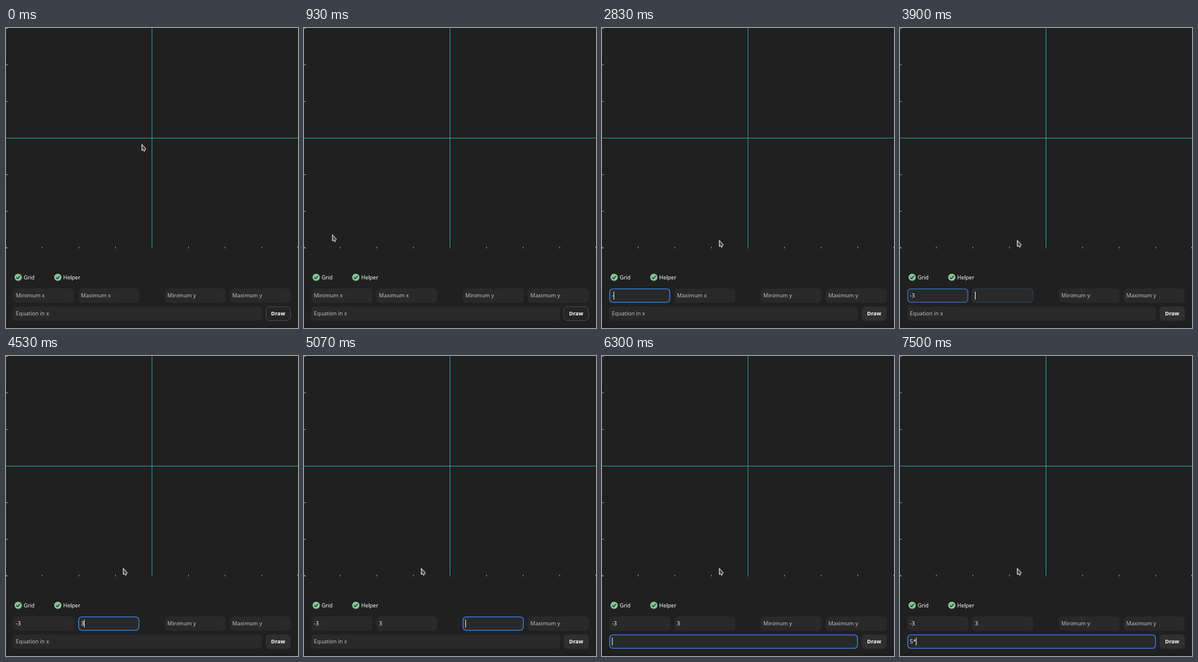
Recreate the animation shown at these times as an HTML page. Size 487 px wide and 500 px high, loop 8000 ms.

```html
<!DOCTYPE html>
<html lang="en">
<head>
<meta charset="utf-8">
<title>Function plotter</title>
<style>
  html, body { margin: 0; width: 100%; height: 100%; overflow: hidden; background: #202020; }
  svg { display: block; width: 487px; height: 500px; }
  text { font: 9px "Noto Sans", "Open Sans", sans-serif; fill: #fff; white-space: pre; }
  .hint { fill: #c0c0c0; }
  .bold { font-weight: 700; }
  .field { fill: #292929; }
  .ring { fill: none; stroke: #3478d0; stroke-width: 1.6; }
  .axis { fill: #30a29b; }
  .tick { fill: #a0a0a0; }
</style>
</head>
<body>
<svg id="stage" viewBox="0 0 487 500"></svg>
<script>
const LOOP = 8000;
const FADE = 200;
const stage = document.getElementById('stage');

function add(tag, attrs, content = '') {
  const el = document.createElementNS('http://www.w3.org/2000/svg', tag);
  for (const key in attrs) el.setAttribute(key, attrs[key]);
  el.textContent = content;
  return stage.appendChild(el);
}
const rect = (cls, x, y, width, height, rx = 0) => add('rect', { class: cls, x, y, width, height, rx });
const text = (cls, x, y, content) => add('text', { class: cls, x, y }, content);
const ramp = (t, start, length) => Math.min(1, Math.max(0, (t - start) / length));
const ease = p => 1 - (1 - p) ** 2;

// Plot area
for (let i = 0; i <= 8; i++) rect('tick', Math.min(486, Math.floor(i * 60.9)), 364.5, 1, 2.8);
for (let i = 0; i <= 6; i++) rect('tick', 0, Math.floor(i * 61.15), 3, 1);
rect('axis', 243, 0, 1, 367);
rect('axis', 0, 183, 487, 1);
add('rect', { x: 0, y: 496, width: 487, height: 4, fill: '#1d1d1d' });

// Check boxes
[[20.3, 'Grid'], [86.4, 'Helper']].forEach(([x, label]) => {
  add('circle', { cx: x, cy: 415.5, r: 6.1, fill: '#82c496' });
  add('path', { d: `M${x - 3} 415.7l2.1 2.1 4-4.4`, fill: 'none', stroke: '#202020', 'stroke-width': 1.4 });
  text('', x + 9.1, 418.7, label);
});

// Button: outlined at rest, filled once the window is active
const button = rect('', 433.5, 464.5, 41, 23, 5.5);
text('bold', 442, 479.3, 'Draw');

// Each field: focus interval and the moments at which its text grows
const fields = [
  { x: 12, y: 434, w: 102, hint: 'Minimum x', from: 1530, to: 3880, typed: [[2830, '-'], [3230, '-3']], off: 2430 },
  { x: 120.4, y: 434, w: 102, hint: 'Maximum x', from: 3880, to: 4830, typed: [[4400, '3']] },
  { x: 264.5, y: 434, w: 102, hint: 'Minimum y', from: 4830, to: 5150, typed: [] },
  { x: 373, y: 434, w: 102, hint: 'Maximum y', from: 5150, to: 5480, typed: [] },
  { x: 12, y: 464, w: 415, hint: 'Equation in x', from: 5480, to: LOOP + FADE, typed: [[6730, '5'], [7470, '5*']], off: 6300 }
];
for (const f of fields) {
  rect('field', f.x, f.y, f.w, 24, 6);
  f.ring = rect('ring', f.x + .8, f.y + .8, f.w - 1.6, 22.4, 5.4);
  f.label = text('hint', f.x + 4.6, f.y + 15.1, f.hint);
  f.caret = add('rect', { y: f.y + 5.3, width: 1, height: 13.2, fill: '#fff' });
}

const arrow = add('path', {
  d: 'M.6.8V11L3 10.1 4.6 12.9 7.2 8Z', fill: '#505050', stroke: '#f4f4f4', 'stroke-linejoin': 'round'
});
const beam = add('path', {
  d: 'M-2.5-4.8Q0-4.8 0-3.4Q0-4.8 2.5-4.8M0-3.4V3.6M-2.5 5Q0 5 0 3.6Q0 5 2.5 5', fill: 'none', stroke: '#e4e4e4', 'stroke-width': 1.2
});

// Pointer path: time, x, y
const path = [
  [0, 226, 193], [700, 226, 193], [760, 205, 212], [930, 47, 343], [1060, 8, 425], [1170, 20, 474],
  [1280, 42, 480], [1500, 59, 452], [1760, 59, 452], [1850, 80, 427], [2000, 150, 376], [2170, 195, 353], [LOOP, 195, 353]
];
function pointerAt(t) {
  const i = path.findIndex(p => p[0] > t);
  const [a, b] = [path[i - 1], path[i]];
  const p = ramp(t, a[0], b[0] - a[0]);
  return [a[1] + (b[1] - a[1]) * p, a[2] + (b[2] - a[2]) * p];
}

function drawField(f, t) {
  const focused = t >= f.from && t < f.to;
  const last = f.typed.filter(([at]) => t >= at).pop();
  const value = last ? last[1] : '';
  const showHint = !value && !focused;
  f.label.textContent = showHint ? f.hint : value;
  f.label.setAttribute('class', showHint ? 'hint' : '');
  f.ring.setAttribute('opacity', ease(ramp(t, f.from, FADE)) * (1 - ease(ramp(t, f.to, FADE))));
  const shown = f.off && !value ? 1 - ramp(t, f.off, 100) : 1;
  f.caret.setAttribute('opacity', focused ? shown : 0);
  f.caret.setAttribute('x', f.x + 4.6 + (value ? f.label.getComputedTextLength() - .2 : 0));
}

function draw(t) {
  fields.forEach(f => drawField(f, t));
  const active = ramp(t, 1530, FADE);
  const shade = Math.round(36 + 11 * active);
  const edge = Math.round(72 - 25 * active);
  button.setAttribute('fill', `rgb(${shade},${shade},${shade})`);
  button.setAttribute('stroke', `rgb(${edge},${edge},${edge})`);

  const [x, y] = pointerAt(t);
  const overField = fields.some(f => x > f.x && x < f.x + f.w && y > f.y && y < f.y + 24);
  for (const [el, on] of [[arrow, !overField], [beam, overField]]) {
    el.setAttribute('transform', `translate(${x} ${y})`);
    el.setAttribute('visibility', on ? 'visible' : 'hidden');
  }
}

function frame() {
  draw(performance.now() % LOOP);
  requestAnimationFrame(frame);
}
frame();
</script>
</body>
</html>
```
